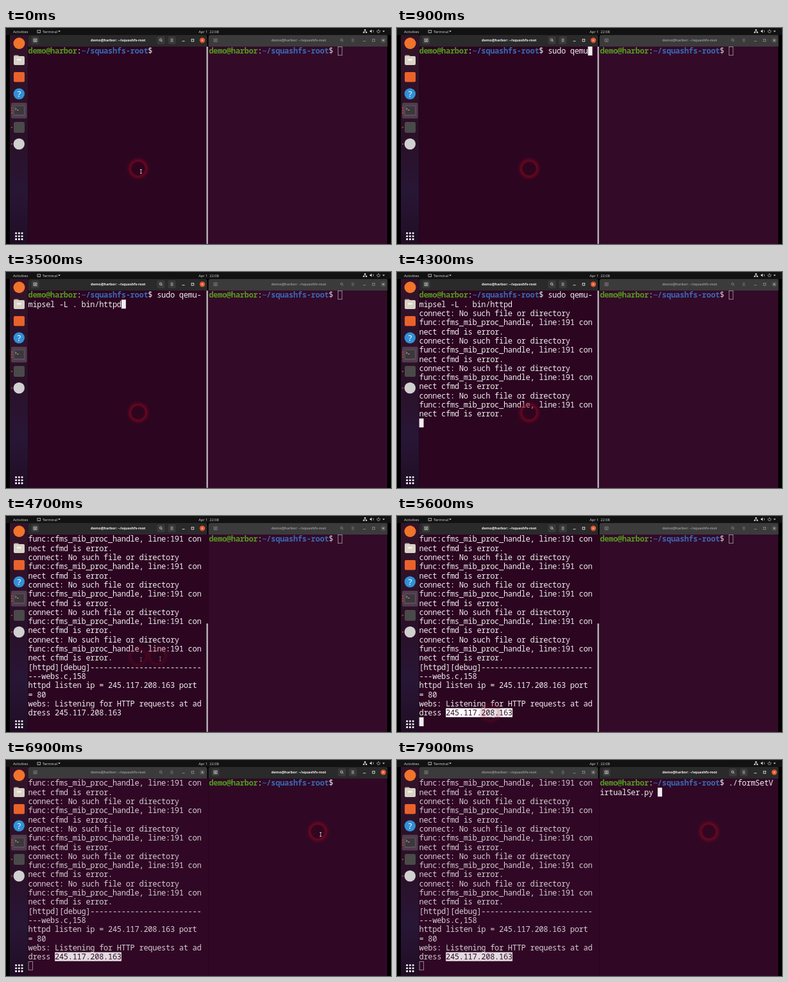
An HTML page with a canvas that plays this animation: 600x338 px, repeating every 8 s.

```html
<!DOCTYPE html>
<html lang="en">
<head>
<meta charset="utf-8">
<title>Terminal session</title>
<style>
  html, body { margin: 0; width: 100%; height: 100%; overflow: hidden; background: #000; }
  canvas { display: block; width: 100vw; height: 100vh; }
</style>
</head>
<body>
<canvas id="stage"></canvas>
<script>
const W = 600, H = 338, LOOP = 8000, STEP = 100;
const canvas = document.getElementById('stage');
const ctx = canvas.getContext('2d');
const dpr = Math.max(1, window.devicePixelRatio || 1);
canvas.width = W * dpr;
canvas.height = H * dpr;

const CELL = 6.92, LINE = 14.3, TOP = 29, ROWS = 21, COLS = 39;
const MONO = '12px "Noto Sans Mono", "DejaVu Sans Mono", monospace';
const UI = '"Open Sans", "Noto Sans", sans-serif';
const WHITE = '#f0edef', DIM = '#d6ccd2', GREEN = '#539b1e', BLUE = '#3a69b4', ORANGE = '#e2522b';

const USER = 'demo@harbor', PATH = '~/squashfs-root', ADDRESS = '245.117.208.163';
const PROMPT_LEN = USER.length + PATH.length + 3;
const LEFT_X = 34.6, RIGHT_X = 316.3;

const COMMAND = 'sudo qemu-mipsel -L . bin/httpd';
const SCRIPT = './formSetVirtualSer.py ';
const FIRST = 9, SECOND = 22;
const ENTER = 4000, OUTPUT = 4300, SELECT = 5400, CLICK = 6200;

const failure = [
  'connect: No such file or directory',
  'func:cfms_mib_proc_handle, line:191 con',
  'nect cfmd is error.'
];
const output = [
  ...Array.from({ length: 30 }, (_, i) => failure[i % 3]),
  '[httpd][debug]' + '-'.repeat(25),
  '---webs.c,158',
  `httpd listen ip = ${ADDRESS} port`,
  '= 80',
  'webs: Listening for HTTP requests at ad',
  'dress ' + ADDRESS
];

const clamp = (v, lo, hi) => Math.min(hi, Math.max(lo, v));

function rect(x, y, w, h, fill, r = 0) {
  ctx.fillStyle = fill;
  ctx.beginPath();
  ctx.roundRect(x, y, w, h, r);
  ctx.fill();
}

function disc(x, y, r, fill) {
  ctx.fillStyle = fill;
  ctx.beginPath();
  ctx.arc(x, y, r, 0, 7);
  ctx.fill();
}

function lines(color, width, ...paths) {
  ctx.strokeStyle = color;
  ctx.lineWidth = width;
  ctx.beginPath();
  for (const p of paths) {
    ctx.moveTo(p[0], p[1]);
    for (let i = 2; i < p.length; i += 2) ctx.lineTo(p[i], p[i + 1]);
  }
  ctx.stroke();
}

function label(text, x, y, size, color, weight = 400, align = 'left') {
  ctx.font = `${weight} ${size}px ${UI}`;
  ctx.fillStyle = color;
  ctx.textAlign = align;
  ctx.fillText(text, x, y);
}

// Terminal text sits on a fixed cell grid.
function cells(text, x0, col, row, color = WHITE, weight = 400) {
  ctx.font = `${weight} ${MONO}`;
  ctx.textAlign = 'center';
  ctx.fillStyle = color;
  const y = TOP + row * LINE + 11.4;
  [...text].forEach((ch, i) => {
    if (ch !== ' ') ctx.fillText(ch, x0 + (col + i + 0.5) * CELL, y);
  });
}

function prompt(x0, row, ink) {
  const mid = USER.length, end = mid + 1 + PATH.length;
  cells(USER, x0, 0, row, GREEN, 700);
  cells(':', x0, mid, row, ink);
  cells(PATH, x0, mid + 1, row, BLUE, 700);
  cells('$', x0, end, row, ink);
}

function promptWith(text, x0, row, ink = WHITE) {
  const room = COLS - PROMPT_LEN;
  prompt(x0, row, ink);
  cells(text.slice(0, room), x0, PROMPT_LEN, row, ink);
  cells(text.slice(room), x0, 0, row + 1, ink);
}

function caret(x0, col, row, solid) {
  const x = x0 + col * CELL, y = TOP + row * LINE;
  if (solid) return rect(x, y, CELL, LINE - 0.3, WHITE);
  ctx.strokeStyle = '#a99fa5';
  ctx.lineWidth = 0.8;
  ctx.strokeRect(x + 0.5, y + 0.5, CELL - 0.6, LINE - 1.1);
}

function caretAfter(count, x0, solid) {
  const pos = PROMPT_LEN + count;
  caret(x0, pos % COLS, Math.floor(pos / COLS), solid);
}

const scrollBar = y => rect(312.4, y, 2.4, H - y, '#bdb7bb', 1.2);
const blink = (t, since) => (t - since) % 1200 < 600;

// Characters typed and the moment of the last key press.
function leftTyping(t) {
  if (t < 100) return [0, -600];
  if (t <= 900) return [t / 100, t];
  if (t <= 1700) return [FIRST + Math.ceil((t - 900) / 800 * (SECOND - FIRST)), t];
  if (t < 2600) return [SECOND, 1700];
  return [Math.min(COMMAND.length, SECOND + (t - 2500) / 100), Math.min(t, 3400)];
}

function rightTyping(t) {
  if (t < 7100) return [0, CLICK];
  if (t < 7700) return [Math.min(5, (t - 7000) / 100), t];
  return [SCRIPT.length, 7700];
}

function titleBar(x, w, active) {
  const ink = active ? '#f1f1f1' : '#929292';
  const r = x + w;
  rect(x, 11, w, 18, active ? '#2a2a2a' : '#3b3b3b', [3, 3, 0, 0]);
  if (active) {
    for (const bx of [x + 5, r - 78, r - 61]) rect(bx, 13, 12, 12.5, '#393939', 2);
  }
  ctx.strokeStyle = ink;
  ctx.lineWidth = 0.7;
  ctx.strokeRect(x + 8.5, 17, 5, 4.6);
  lines(ink, 0.7, [x + 11, 18, x + 11, 20.6], [x + 9.7, 19.3, x + 12.3, 19.3]);
  ctx.beginPath();
  ctx.arc(r - 72.5, 18.6, 1.7, 0, 7);
  ctx.stroke();
  lines(ink, 0.8, [r - 71.3, 19.8, r - 69.8, 21.3]);
  lines(ink, 0.6, ...[17.3, 19.2, 21.1].map(y => [r - 57, y, r - 53, y]));
  lines(ink, 0.8, [r - 39, 20.6, r - 35, 20.6]);
  ctx.strokeRect(r - 24.4, 17.4, 3.6, 3.6);
  const cx = r - 7.5, cy = 19.3;
  disc(cx, cy, 4.2, active ? ORANGE : '#4c4c4c');
  const cross = active ? ink : '#dedede';
  lines(cross, 0.8, [cx - 1.5, cy - 1.5, cx + 1.5, cy + 1.5], [cx + 1.5, cy - 1.5, cx - 1.5, cy + 1.5]);
  label(`${USER}: ${PATH}`, x + w / 2 + 0.8, 21.4, 5.5, ink, 700, 'center');
}

function topBar() {
  rect(0, 0, W, 11, '#131213');
  label('Activities', 11, 7.7, 5.7, '#dcdcdc');
  rect(48.5, 2.9, 5.6, 5, '#bbb', 0.8);
  rect(49.3, 3.7, 4, 3.4, '#222');
  label('Terminal', 57, 7.7, 5.7, '#dcdcdc');
  label('Apr 1  22:08', 316, 7.7, 5.7, '#dcdcdc', 400, 'center');
  const ink = '#d4d4d4';
  for (const x of [83, 588.5]) {
    ctx.fillStyle = ink;
    ctx.beginPath();
    ctx.moveTo(x - 1.8, 4.3);
    ctx.lineTo(x + 1.8, 4.3);
    ctx.lineTo(x, 6.5);
    ctx.fill();
  }
  lines(ink, 0.7, [559.5, 3.5, 559.5, 5.2], [557.5, 6.5, 557.5, 5.2, 561.5, 5.2, 561.5, 6.5]);
  rect(558.3, 2, 2.4, 2, ink);
  rect(556.5, 6, 2.2, 2, ink);
  rect(560.4, 6, 2.2, 2, ink);
  ctx.fillStyle = ink;
  ctx.beginPath();
  ctx.moveTo(567, 4); ctx.lineTo(568.3, 4); ctx.lineTo(570, 2.3);
  ctx.lineTo(570, 7.7); ctx.lineTo(568.3, 6); ctx.lineTo(567, 6);
  ctx.fill();
  ctx.strokeStyle = ink;
  ctx.lineWidth = 0.7;
  ctx.beginPath();
  ctx.arc(570, 5, 2.6, -0.8, 0.8);
  ctx.stroke();
  ctx.beginPath();
  ctx.arc(580.5, 5.2, 2.3, -0.9, 4.04);
  ctx.stroke();
  lines(ink, 0.7, [580.5, 2, 580.5, 5]);
}

function dock() {
  const g = ctx.createLinearGradient(0, 11, 0, H);
  g.addColorStop(0, '#33142a');
  g.addColorStop(0.5, '#2a1028');
  g.addColorStop(0.75, '#281636');
  g.addColorStop(1, '#200d24');
  rect(6, 11, 28.5, H - 11, g);

  disc(20.5, 24, 9, '#f1742b');

  rect(12, 42.5, 8, 5, '#b5aa9b', 1.5);
  rect(12, 44, 17, 14, '#d9d2c6', 2);
  rect(17, 48.5, 7, 2.4, '#f5f2ec', 0.8);

  rect(12, 69, 17, 15.5, '#e9622b', 2);

  disc(20.3, 103, 8.7, '#3290d6');
  label('?', 20.3, 107.7, 13.5, '#fff', 400, 'center');

  rect(8, 117, 24.5, 24.5, '#513c4e', 2);
  rect(11.8, 121.5, 17, 15.5, '#665c64', 1.5);
  rect(12.6, 122.3, 15.4, 13.5, '#3b373b', 1);
  lines('#cfcfcf', 0.8, [14.2, 125, 16.2, 126.5, 14.2, 128], [17, 128.4, 19.6, 128.4]);

  rect(12, 147, 17, 17, '#4a4a4a', 2.5);
  disc(20.3, 181.5, 8.7, '#d0d0d0');

  for (const y of [125.3, 129.2, 133.1, 155.5, 181.5]) disc(9, y, 1, ORANGE);
  for (let i = 0; i < 9; i++) {
    rect(14.2 + i % 3 * 4.7, 319.7 + Math.floor(i / 3) * 4.7, 2.9, 2.9, '#f0f0f0', 0.8);
  }
}

function leftPane(t, active) {
  if (t < OUTPUT) {
    const [count, since] = leftTyping(t);
    promptWith(COMMAND.slice(0, count), LEFT_X, 0);
    if (t >= ENTER) {
      if (blink(t, ENTER)) caret(LEFT_X, 0, 2, true);
    } else if (blink(t, since)) caretAfter(count, LEFT_X, true);
    scrollBar(TOP);
    return;
  }
  const ink = active ? WHITE : DIM;
  const shown = clamp(12 + Math.floor((t - OUTPUT) / STEP) * 9, 0, output.length);
  const top = Math.max(0, shown + 3 - ROWS);
  if (top === 0) promptWith(COMMAND, LEFT_X, 0);
  for (let i = 0; i < shown; i++) {
    const row = i + 2 - top;
    if (row >= 0) cells(output[i], LEFT_X, 0, row, ink);
  }
  if (t >= SELECT) {
    const row = output.length + 1 - top;
    rect(LEFT_X + 6 * CELL, TOP + row * LINE, ADDRESS.length * CELL, LINE - 0.3, active ? '#fff' : '#e2dadf');
    cells(ADDRESS, LEFT_X, 6, row, '#300a24');
  }
  if (!active || blink(t, ENTER)) caret(LEFT_X, 0, shown + 2 - top, active);
  if (active) scrollBar(TOP + (H - TOP) * top / (top + ROWS + 1));
}

function rightPane(t, active) {
  const [count, since] = rightTyping(t);
  promptWith(SCRIPT.slice(0, count), RIGHT_X, 0, active ? WHITE : DIM);
  if (!active || blink(t, since)) caretAfter(count, RIGHT_X, active);
}

// time, x, y
const route = [
  [4600, 206, 220], [4700, 236, 219], [4800, 246, 224],
  [5200, 146, 308], [5700, 146, 308], [6100, 486, 112]
];

function pointerAt(t) {
  const next = route.findIndex(k => k[0] > t);
  if (next === 0) return route[0].slice(1);
  if (next < 0) return route[route.length - 1].slice(1);
  const a = route[next - 1], b = route[next];
  const f = (t - a[0]) / (b[0] - a[0]);
  return [a[1] + (b[1] - a[1]) * f, a[2] + (b[2] - a[2]) * f];
}

function pointer([x, y], alpha, beam) {
  const g = ctx.createRadialGradient(x, y, 0, x, y, 19);
  g.addColorStop(0, 'rgba(45,0,20,0.15)');
  g.addColorStop(0.5, 'rgba(60,0,20,0.3)');
  g.addColorStop(0.62, 'rgba(140,8,30,0.62)');
  g.addColorStop(0.72, 'rgba(130,8,30,0.5)');
  g.addColorStop(0.85, 'rgba(100,5,28,0.3)');
  g.addColorStop(1, 'rgba(90,0,30,0)');
  ctx.globalAlpha = alpha;
  disc(x, y, 19, g);
  if (beam) {
    const bx = x + 4.3, by = y + 4.5;
    lines('#e6dfe3', 0.8, [bx, by - 3, bx, by + 3], [bx - 1.5, by - 3, bx + 1.5, by - 3], [bx - 1.5, by + 3, bx + 1.5, by + 3]);
  }
  ctx.globalAlpha = 1;
}

function drawPointer(t) {
  const now = pointerAt(t), before = pointerAt(t - STEP);
  const moving = now[0] !== before[0] || now[1] !== before[1];
  const beam = t < 100 || (t >= 4600 && t < 7100);
  if (moving) pointer(before, 0.4, beam);
  const pressed = t >= SELECT && t < 5800;
  pointer(now, moving || pressed ? 0.45 : 1, beam);
}

function draw(time) {
  const t = Math.floor(time / STEP) * STEP;
  const leftActive = t < CLICK;
  ctx.setTransform(dpr, 0, 0, dpr, 0, 0);
  rect(0, 0, W, H, '#000');
  topBar();
  dock();
  rect(34.5, TOP, 281, H - TOP, leftActive ? '#2c0521' : '#300825');
  rect(315.5, TOP, 278.5, H - TOP, leftActive ? '#340a29' : '#300825');
  titleBar(34.5, 279, leftActive);
  titleBar(315.5, 280, !leftActive);
  leftPane(t, leftActive);
  rightPane(t, !leftActive);
  drawPointer(t);
  rect(594.5, 11, 5.5, H - 11, '#000');
}

function frame() {
  draw(performance.now() % LOOP);
  requestAnimationFrame(frame);
}
frame();
</script>
</body>
</html>
```
